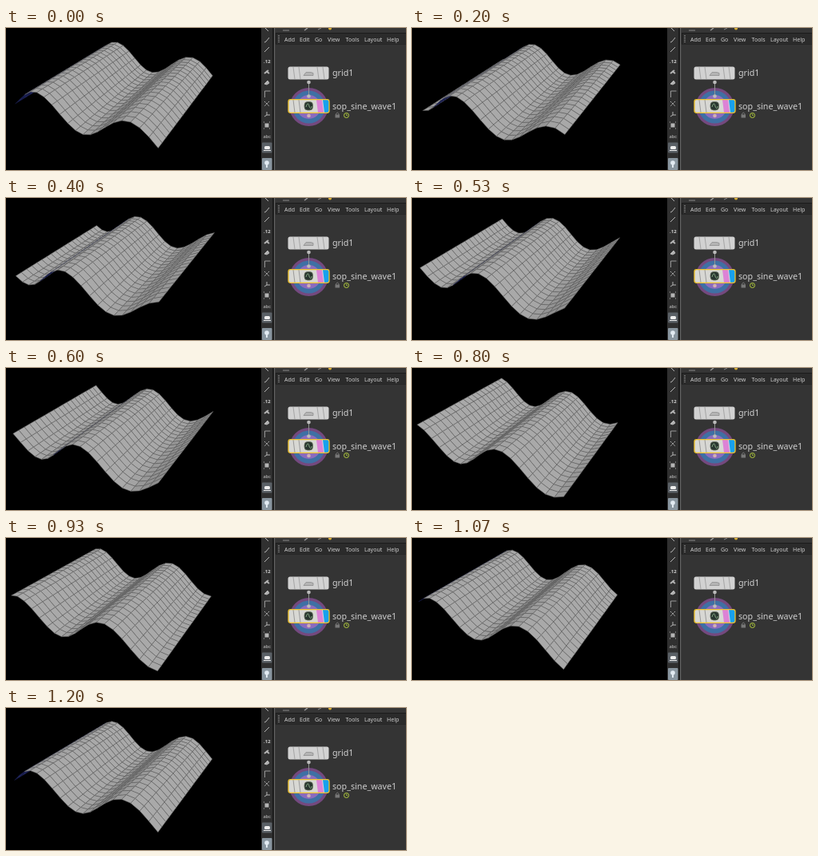
An HTML page with a canvas that plays this animation: 500x178 px, repeating every 1.27 s.

```html
<!DOCTYPE html>
<html lang="en">
<head>
<meta charset="utf-8">
<title>Sine wave surface</title>
<style>
  html, body { margin: 0; width: 100%; height: 100%; overflow: hidden; background: #000; }
  canvas, svg { position: absolute; left: 0; top: 0; display: block; }
  text { font-family: "Noto Sans", "Open Sans", sans-serif; fill: #cfcfcf; }
  .menu { font-size: 7px; }
  .node { font-size: 10.7px; }
  .tool { fill: none; stroke: #b4b4b4; }
</style>
</head>
<body>
<canvas id="view" width="500" height="178"></canvas>
<svg width="500" height="178" viewBox="0 0 500 178">
  <!-- toolbar -->
  <rect x="319" width="181" height="178" fill="#1b1b1b"/>
  <rect x="319" width="14" height="178" fill="#303030"/>
  <rect x="335" width="1.5" height="178" fill="#626262"/>
  <rect x="320" y="143.5" width="12.5" height="13" rx="1" fill="#5a6066"/>
  <rect x="320" y="163" width="12.5" height="15" rx="1" fill="#8996a0"/>
  <g class="tool">
    <path d="M324 0l4 4M323 18l2-1 4-5M323 30l6-6"/>
    <path d="M323 57l5-4M325 54l4 3" stroke-width="2"/>
    <path d="M323 70l4-4 2 3-3 2z" fill="#b4b4b4"/>
    <path d="M323.5 87v-8h7" stroke-width=".8"/>
    <path d="M323 92l6 6m0-6l-6 6" stroke-dasharray="2 1"/>
    <path d="M323 111l3-2h4M326 109v-4"/>
    <rect x="324" y="120" width="4" height="4" fill="#b4b4b4"/>
    <path d="M322 118h1m6 0h1m-8 8h1m6 0h1"/>
  </g>
  <rect x="323" y="148" width="7" height="4" rx="1.5" fill="#eee"/>
  <path d="M322 153.5h9" stroke="#eee"/>
  <circle cx="326" cy="169" r="2.8" fill="#e2eaf1"/>
  <path d="M326 171v4" stroke="#e2eaf1" stroke-width="2"/>
  <text x="322" y="43.5" font-size="6" font-weight="bold">.12</text>
  <text x="321.5" y="138" font-size="5.8">abc</text>

  <!-- network pane -->
  <rect x="337" width="163" height="6" fill="#353535"/>
  <path d="M346 3h8M390 2l4-2" stroke="#888"/>
  <path d="M373 3l4-3" stroke="#999" stroke-width="1.5"/>
  <circle cx="405" cy=".5" r="2" fill="#d6ad35"/>
  <rect x="338" y="7" width="162" height="13" fill="#2b2b2b"/>
  <rect x="337" y="20.5" width="163" height="157.5" fill="#343434"/>
  <path d="M341 9v9" stroke="#777" stroke-width="2" stroke-dasharray="1 1"/>
  <g class="menu">
    <text x="348" y="16.5">Add</text><text x="367" y="16.5">Edit</text>
    <text x="386" y="16.5">Go</text><text x="402" y="16.5">View</text>
    <text x="424.5" y="16.5">Tools</text><text x="448" y="16.5">Layout</text>
    <text x="476" y="16.5">Help</text>
  </g>

  <circle cx="378.5" cy="99" r="24" fill="#74497f"/>
  <circle cx="378.5" cy="99" r="20.5" fill="#3f70a4"/>
  <circle cx="378.5" cy="99" r="15" fill="#8c6cbd"/>
  <path d="M378.5 68v17" stroke="#929292"/>
  <g fill="#bbb">
    <circle cx="378.5" cy="68" r="2.3"/><circle cx="378.5" cy="85.5" r="2.3"/>
    <circle cx="378.5" cy="110" r="2.3" fill="#d0b0b4"/>
  </g>

  <rect x="352.5" y="48.5" width="51" height="16" rx="2.5" fill="#d2d2d2"/>
  <path d="M359 49l2 15M366 49l2 15M389 49l2 15M396 49l2 15" stroke="#a5a5a5"/>
  <path d="M372 59.5l3-4h6l3 1v3z" fill="#b4b4b4" stroke="#888" stroke-width=".7"/>
  <text class="node" x="408" y="60">grid1</text>

  <rect x="353" y="90" width="51" height="16" rx="2.5" fill="#d8d8d4"/>
  <path d="M388 90h7l2 16h-7z" fill="#dd82d6"/>
  <path d="M396 90h5q3 0 3 3v10q0 3-3 3h-3z" fill="#18a0ed"/>
  <path d="M359 90l2 16M366 90l2 16" stroke="#9a9a9a"/>
  <rect x="353" y="89.7" width="51" height="16.6" rx="2.5" fill="none" stroke="#ecc02c" stroke-width="1.3"/>
  <rect x="373" y="92.5" width="10.5" height="10.5" rx="4" fill="#29352f" stroke="#66705c" stroke-width=".8"/>
  <path d="M375 99c2-6 3-5 4-1s3 3 3 0" fill="none" stroke="#8fb58b" stroke-width=".9"/>
  <text class="node" x="408" y="101.5">sop_sine_wave1</text>
  <rect x="411.5" y="108.5" width="5.5" height="4" fill="#777"/>
  <path d="M412.5 109v-1.5q1.7-3 3.5 0v1.5" fill="none" stroke="#777"/>
  <circle cx="425.5" cy="109.5" r="3" fill="none" stroke="#b5cf3c"/>
  <path d="M425.5 107.5v2h1.5" fill="none" stroke="#b5cf3c" stroke-width=".7"/>
</svg>
<script>
const ctx = document.getElementById('view').getContext('2d');
const CELLS = 19, LOOP = 1270, STEP = 200 / 3;

// Perspective of the unit square (u, v) raised by height h
function project(u, v, h) {
  const lift = 0.024 * h;
  const w = 1 - 0.204 * u + 0.333 * v - lift;
  return [(10 + 141.48 * u + 140.36 * v - 160 * lift) / w,
          (87.5 + 30.79 * u - 52.58 * v - 776 * lift) / w];
}

function drawQuad(i, j, phase) {
  const corner = (di, dj) => {
    const u = (i + di) / CELLS;
    return project(u, (j + dj) / CELLS, Math.sin(10 * u + phase));
  };
  const [a, b, c, d] = [corner(0, 0), corner(1, 0), corner(1, 1), corner(0, 1)];
  const facing = (c[0] - a[0]) * (d[1] - b[1]) - (c[1] - a[1]) * (d[0] - b[0]);
  const slope = Math.cos(10 * (i + 0.5) / CELLS + phase);
  const light = (0.52 - 0.4 * slope) / Math.hypot(1, slope);
  const grey = Math.round(138 + 48 * light);
  ctx.beginPath();
  for (const p of [a, b, c, d]) ctx.lineTo(...p);
  ctx.closePath();
  ctx.fillStyle = facing < 0 ? `rgb(${grey},${grey},${grey})` : '#20265f';
  ctx.strokeStyle = facing < 0 ? '#606060' : '#171b45';
  ctx.fill();
  ctx.stroke();
}

function render(now) {
  const tick = Math.min(18, Math.floor((now % LOOP + 3.4) / STEP));
  const phase = -0.47 - tick / 3;
  ctx.fillStyle = '#000';
  ctx.fillRect(0, 0, 500, 178);
  ctx.lineWidth = 0.5;
  ctx.lineJoin = 'round';
  // Far cells first
  for (let i = 0; i < CELLS; i++)
    for (let j = CELLS - 1; j >= 0; j--) drawQuad(i, j, phase);
}

let start;
function loop(now) {
  start ??= now;
  render(now - start);
  requestAnimationFrame(loop);
}
render(0);
requestAnimationFrame(loop);
</script>
</body>
</html>
```
